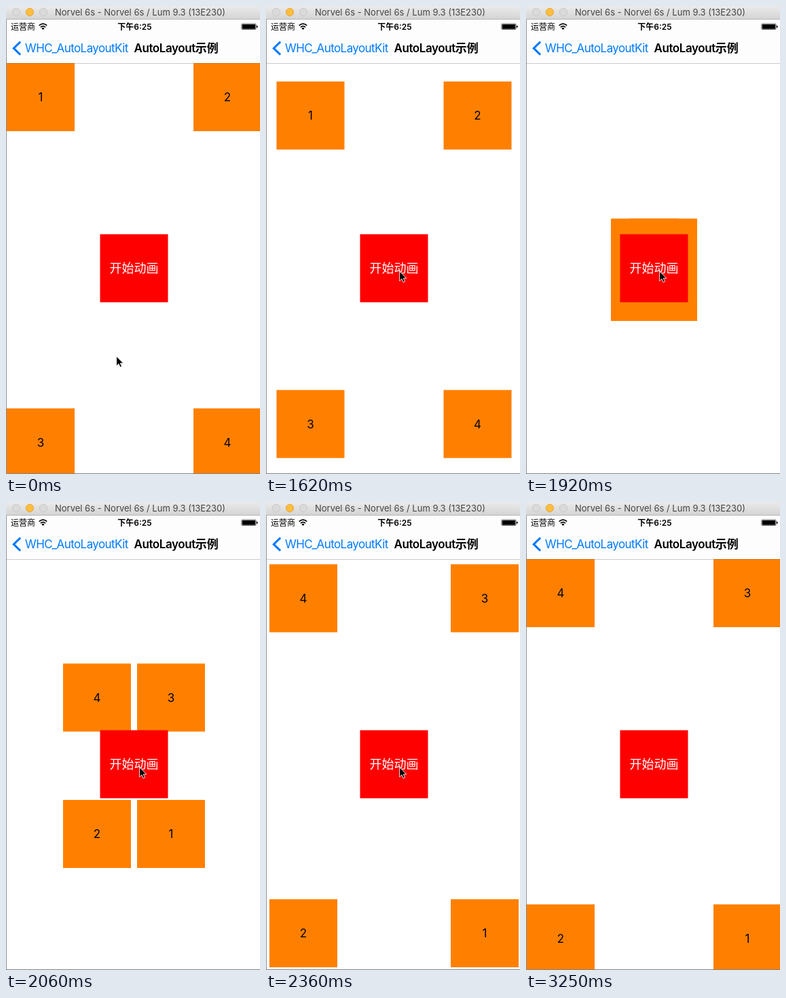
Write an HTML page that moves like this. It is 374x688 px and loops after 3840 ms.

```html
<!DOCTYPE html>
<html lang="zh">
<head>
<meta charset="utf-8">
<title>AutoLayout</title>
<style>
  html, body { margin: 0; width: 100%; height: 100%; overflow: hidden; background: #fff; }
  svg { display: block; width: 374px; height: 688px; }
  text { font-family: Inter, "Noto Sans CJK SC", "Noto Sans CJK", sans-serif; }
  .mid { text-anchor: middle; }
</style>
</head>
<body>
<svg viewBox="0 0 374 688" xmlns="http://www.w3.org/2000/svg">
  <defs>
    <linearGradient id="bar" x1="0" y1="0" x2="0" y2="1">
      <stop offset="0" stop-color="#ebebeb"/>
      <stop offset="1" stop-color="#d3d3d3"/>
    </linearGradient>
  </defs>
  <rect width="374" height="688" fill="#fff"/>

  <g id="tiles" font-size="17"></g>

  <!-- centre button -->
  <rect x="138.5" y="335.5" width="100" height="100" fill="#f00"/>
  <text class="mid" x="188.5" y="392.3" font-size="18" fill="#fff">开始动画</text>

  <!-- navigation bar -->
  <rect y="20" width="374" height="64" fill="#fdfdfd"/>
  <rect y="84" width="374" height="1" opacity=".2"/>
  <path d="M21.2 52.7L11.3 62.2L21.2 71.7" fill="none" stroke="#007aff" stroke-width="3"/>
  <text x="28" y="68.2" font-size="17" fill="#007aff" letter-spacing="-.58">WHC_AutoLayoutKit</text>
  <text x="188.5" y="68.2" font-size="17" font-weight="600" letter-spacing="-.43">AutoLayout<tspan letter-spacing="0">示例</tspan></text>

  <!-- status bar -->
  <text x="7" y="34.6" font-size="12">运营商</text>
  <g fill="none" stroke="#000" stroke-width="1.7">
    <path d="M48.7 28.7Q54.5 23.7 60.3 28.7"/>
    <path d="M50.9 31.1Q54.5 28 58.1 31.1"/>
  </g>
  <path d="M52.4 32.7Q54.5 31 56.6 32.7L54.5 35z"/>
  <text class="mid" x="189.5" y="34.5" font-size="12" font-weight="600">下午6:25</text>
  <rect x="346.8" y="26" width="21.4" height="8.6" rx="1.6" fill="none" stroke="#000" stroke-width=".6"/>
  <rect x="347.7" y="26.9" width="19.6" height="6.8" rx=".9"/>
  <path d="M369 28.7q1.8.3 1.8 1.6t-1.8 1.6z"/>

  <!-- window frame -->
  <rect width="374" height="20" fill="url(#bar)"/>
  <rect y="19" width="374" height="1" fill="#b8b8b8"/>
  <g stroke-width=".8">
    <circle cx="15" cy="9" r="5.7" fill="#dadada" stroke="#c3c3c3"/>
    <circle cx="35" cy="9" r="5.7" fill="#fdbd3e" stroke="#dfa034"/>
    <circle cx="55" cy="9" r="5.7" fill="#dadada" stroke="#c3c3c3"/>
  </g>
  <text class="mid" x="197.5" y="14" font-size="13" fill="#444">Norvel 6s - Norvel 6s / Lum 9.3 (13E230)</text>
  <rect y="20" width="1" height="668" fill="#8f8f8f"/>
  <rect y="687" width="374" height="1" fill="#858585"/>

  <path id="cursor" d="M1.6 1V15.2L4.9 12.1L7.1 17.1L9.5 16.1L7.3 11.2H11.8Z"
    stroke="#fff" stroke-width=".9" stroke-linejoin="round"/>
</svg>
<script>
const NS = 'http://www.w3.org/2000/svg';
const LOOP = 3840;
const LEFT = 1, RIGHT = 276, TOP = 84, BOTTOM = 591.5;

// [time, x, y]: the pointer is hidden when x is missing
const POINTER = [
  [0, 161, 514], [150, 163, 514], [300, 167, 511], [440, 176, 491],
  [590, 191, 438], [740, 195, 397], [880, 195, 389],
  [2800, 203, 417], [2950, 286, 602], [3100, 309, 666], [3250]
];
// [time, progress of the one-second swap]
const SWAP = [
  [0, 0], [1620, .163], [1770, .322], [1920, .471],
  [2060, .619], [2210, .759], [2360, .914], [2510, 1]
];

const cursor = document.getElementById('cursor');
const tiles = [1, 2, 3, 4].map(makeTile);

function add(parent, tag, attrs) {
  const el = document.createElementNS(NS, tag);
  for (const key in attrs) el.setAttribute(key, attrs[key]);
  return parent.appendChild(el);
}

function makeTile(n) {
  const g = add(document.getElementById('tiles'), 'g', {});
  add(g, 'rect', { width: 100, height: 100, fill: '#ff8000' });
  add(g, 'text', { x: 50, y: 56.2, class: 'mid' }).textContent = n;
  return g;
}

// cubic-bezier(.42, 0, .58, 1), solved by bisection
function easeInOut(x) {
  let lo = 0, hi = 1;
  for (let i = 0; i < 24; i++) {
    const s = (lo + hi) / 2, r = 1 - s;
    if (1.26 * r * r * s + 1.74 * r * s * s + s * s * s < x) lo = s; else hi = s;
  }
  return lo * lo * (3 - 2 * lo);
}

const held = (steps, t) => steps.filter(step => step[0] <= t).pop();
const snap = v => Math.round(v * 2) / 2;
const mix = (a, b, p) => snap(a + (b - a) * p);

function draw(t) {
  const phase = held(SWAP, t)[1];
  const p = phase === 0 || phase === 1 ? phase : easeInOut(phase);
  tiles.forEach((tile, i) => {
    const x = i % 2 ? mix(RIGHT, LEFT, p) : mix(LEFT, RIGHT, p);
    const y = i > 1 ? mix(BOTTOM, TOP, p) : mix(TOP, BOTTOM, p);
    tile.setAttribute('transform', `translate(${x} ${y})`);
  });

  const [, cx, cy] = held(POINTER, t);
  cursor.setAttribute('visibility', cx === undefined ? 'hidden' : 'visible');
  if (cx !== undefined) cursor.setAttribute('transform', `translate(${cx} ${cy})`);
}

const start = performance.now();
function tick() {
  draw((performance.now() - start) % LOOP);
  requestAnimationFrame(tick);
}
tick();
</script>
</body>
</html>
```
